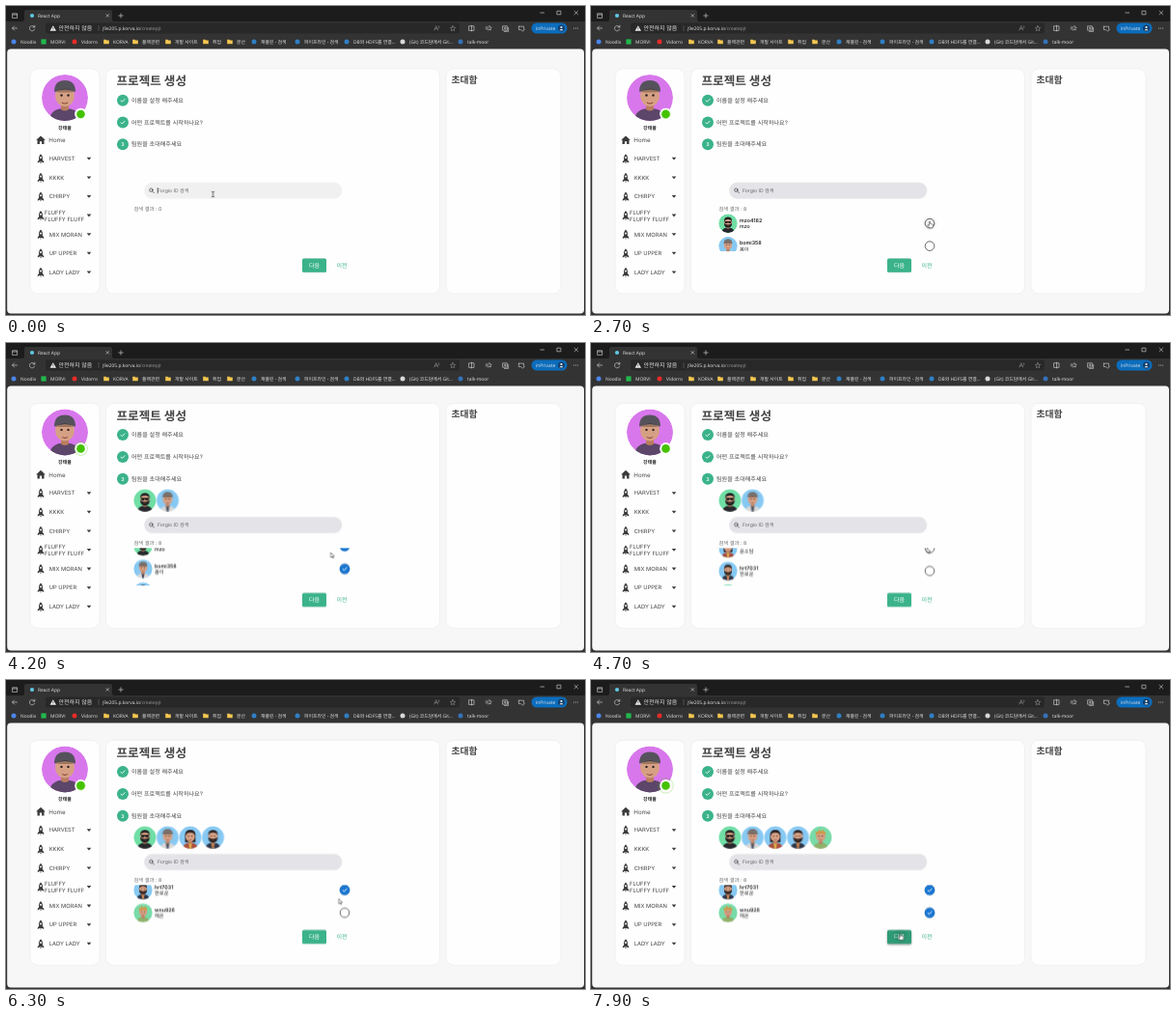
Animation of 600 by 320 pixels, one loop 8000 ms. Source, as an HTML page:

```html
<!DOCTYPE html>
<html lang="ko">
<head>
<meta charset="utf-8">
<title>React App</title>
<style>
html, body { margin: 0; width: 100%; height: 100%; overflow: hidden; background: #1c1c1c; }
svg { display: block; width: 600px; height: 320px; }
text { font-family: Inter, 'Noto Sans CJK KR', sans-serif; fill: #444; text-rendering: geometricPrecision; }
#chrome text { font-family: 'Open Sans', 'Noto Sans CJK KR', sans-serif; font-size: 4.9px; fill: #e6e6e6; }
#chrome .notice { font-size: 6px; }
.icon { fill: none; stroke: #cfcfcf; stroke-width: .65; stroke-linecap: round; stroke-linejoin: round; }
.dim { stroke: #8c8c8c; }
.card { fill: #fefefe; stroke: #ededee; stroke-width: .7; }
.green { fill: #3bb38a; }

#page, #list, #count0, #count1, #hint, #caret, #ibeam, #arrow, #hand, .pick {
  animation: 8s step-end infinite;
}
#page { animation-name: lift; }
#list, #count1 { animation-name: found; }
#count0 { animation-name: empty; }
#hint { animation-name: hint; }
#caret { animation-name: caret; }
#ibeam { animation-name: ibeam; }
#arrow { animation-name: arrow; }
#hand { animation-name: hand; }
#field { animation: field 8s linear infinite; }
#rows { animation: scroll 8s ease-in-out infinite; }
#cursor { animation: move 8s ease-in-out infinite; }
#next { animation: next 8s linear infinite; }
.p0 { animation-name: p0; } .p1 { animation-name: p1; } .p2 { animation-name: p2; }
.p3 { animation-name: p3; } .p4 { animation-name: p4; }

@keyframes lift { 0% { transform: none } 35% { transform: translateY(-2.6px) } }
@keyframes found { 0% { opacity: 0 } 11.5% { opacity: 1 } }
@keyframes empty { 0% { opacity: 1 } 11.5% { opacity: 0 } 100% { opacity: 0 } }
@keyframes hint { 0%, 32% { opacity: 1 } 6.5% { opacity: 0 } }
@keyframes caret {
  0% { opacity: 1; transform: none }
  6.5% { opacity: 0; transform: translateX(1.6px) }
  13.25%, 26.5% { opacity: 1; transform: translateX(1.6px) }
  19.9%, 32% { opacity: 0; transform: translateX(1.6px) }
}
@keyframes field {
  0% { fill: #f0f0f1; stroke: #f0f0f1 }
  2.5%, 32% { fill: #fefefe; stroke: #ececee }
  33.6%, 100% { fill: #e4e4e8; stroke: #e4e4e8 }
}
@keyframes scroll {
  0%, 50.5% { transform: none }
  56.8%, 75% { transform: translateY(-57px) }
  78%, 100% { transform: translateY(-75.5px) }
}
@keyframes p0 { 0% { opacity: 0 } 35% { opacity: 1 } }
@keyframes p1 { 0% { opacity: 0 } 42.5% { opacity: 1 } }
@keyframes p2 { 0% { opacity: 0 } 61.25% { opacity: 1 } }
@keyframes p3 { 0% { opacity: 0 } 73.75% { opacity: 1 } }
@keyframes p4 { 0% { opacity: 0 } 85% { opacity: 1 } }
@keyframes next {
  0%, 93.5% { fill: #3bb38a; filter: drop-shadow(0 .4px .4px #0003) }
  96%, 100% { fill: #2f9b76; filter: drop-shadow(0 1px 1.2px #0006) }
}
@keyframes move {
  0%, 21.5% { transform: translate(214.5px, 195px) }
  28.75%, 36.25% { transform: translate(351px, 223px) }
  39.4%, 45% { transform: translate(351px, 244px) }
  50%, 57.1% { transform: translate(336.5px, 217px) }
  59.5%, 63.1% { transform: translate(351px, 211px) }
  65.6%, 66.9% { transform: translate(341.5px, 222px) }
  69.4%, 74.4% { transform: translate(351px, 234px) }
  77.5%, 79.4% { transform: translate(344.8px, 226.5px) }
  81.9%, 86.25% { transform: translate(351px, 239px) }
  94%, 100% { transform: translate(320.5px, 262.5px) }
}
@keyframes ibeam { 0% { opacity: 1 } 22.5% { opacity: 0 } 100% { opacity: 0 } }
@keyframes arrow {
  0%, 28.1%, 39.4%, 58.8%, 69.4%, 81.9%, 93.8% { opacity: 0 }
  22.5%, 36.3%, 45%, 63.1%, 75%, 87.5% { opacity: 1 }
}
@keyframes hand {
  0%, 36.3%, 45%, 63.1%, 75%, 87.5% { opacity: 0 }
  28.1%, 39.4%, 58.8%, 69.4%, 81.9%, 93.8% { opacity: 1 }
}
</style>
</head>
<body>
<svg viewBox="0 0 600 320">
  <defs>
    <clipPath id="disc"><circle r="24"/></clipPath>
    <clipPath id="window"><rect x="125" y="215.2" width="245" height="38.8"/></clipPath>
    <path id="rocket" fill-rule="evenodd" d="M0-4.8C2-3 2.2-.5 1.8 1.4L3.2 3V4.6L1.2 3.5H-1.2L-3.2 4.6V3L-1.8 1.4C-2.2-.5-2-3 0-4.8ZM0-2A1 1 0 1 0 0 0A1 1 0 1 0 0-2ZM-.8 4H.8L0 5.3Z"/>
    <path id="folder" fill="#f3c64f" d="M-2.8-2.2H-.6L.2-1.5H2.8V2.2H-2.8Z"/>
    <path id="tick" d="M-2.2 0L-.7 1.5L2.3-1.5" fill="none" stroke="#fff"/>
  </defs>

  <g id="chrome">
    <rect width="600" height="320" fill="#1c1c1c"/>
    <path d="M0 16H17Q19 16 19 14V6Q19 4 21 4H108Q110 4 110 6V14Q110 16 112 16H600V320H0Z" fill="#333"/>
    <rect x="41" y="17.5" width="429" height="11" rx="2.5" fill="#282828"/>
    <circle cx="27" cy="10" r="2.1" fill="#61c8e4"/>
    <text x="33" y="11.6">React App</text>
    <g class="icon">
      <path d="M7 7.8H11.6V12.4H7ZM7 9H11.6M104 8.6L106.6 11.2M106.6 8.6L104 11.2M119 7.8V12.2M116.8 10H121.2"/>
      <path d="M553.8 7H557.6M571.3 5.2H574.9V8.8H571.3ZM589 5.2L592.6 8.8M592.6 5.2L589 8.8"/>
      <path d="M11.5 23H6.5M8.6 20.9L6.5 23L8.6 25.1M29.6 22A2.7 2.7 0 1 0 29.6 24.3M29.8 20.2V22H28"/>
      <path class="dim" d="M443.8 25L445.8 20.6L447.6 25M444.6 23.6H446.8M448.6 20.8Q449.4 22 448.6 23"/>
      <path class="dim" d="M463 20.5L463.8 22.3L465.7 22.5L464.3 23.8L464.7 25.7L463 24.7L461.3 25.7L461.7 23.8L460.3 22.5L462.2 22.3Z"/>
      <path d="M480 20.8H485V25.4H480ZM482.5 20.2V26M497.2 22H500M497.2 23.8H499.2M500.8 20.4L501.5 22L503.2 22.2L502 23.4L502.3 25L500.8 24.2L499.4 25"/>
      <path d="M515 20.8H519.4V25.2H515ZM516.4 26.4H520.6V22.4M517.2 22V24M516.2 23H518.2M531.4 21.2H536.6V24M531.4 21.2V24.6H533.4M534.4 25.2L535.6 26.2L537.4 24.2"/>
    </g>
    <g fill="#d4d4d4"><circle cx="588.4" cy="23" r=".5"/><circle cx="590.4" cy="23" r=".5"/><circle cx="592.4" cy="23" r=".5"/></g>
    <path d="M48.8 20.2L52 25.8H45.6Z" fill="#eee"/><path d="M48.8 22V24M48.8 24.6V25" stroke="#282828" stroke-width=".6"/>
    <text class="notice" x="54.5" y="25.1">안전하지 않음</text>
    <path d="M96 20V26" stroke="#777" stroke-width=".5"/>
    <text x="100" y="24.8">j9e205.p.korva.io<tspan fill="#999">/createpjt</tspan></text>
    <rect x="544.5" y="17.5" width="37" height="11" rx="5.5" fill="#0c6dbd"/>
    <text x="549" y="24.7">InPrivate</text>
    <circle cx="575.5" cy="23" r="3.5" fill="#143f6b"/><circle cx="575.5" cy="22" r="1.1" fill="#fff"/><path d="M573.5 25.3Q575.5 22.6 577.5 25.3Z" fill="#fff"/>
    <g id="marks"></g>
  </g>

  <rect x="1.2" y="44.4" width="597.8" height="274" rx="4" fill="#f7f7f8"/>

  <g id="page">
    <rect class="card" x="25" y="65" width="72" height="233" rx="8"/>
    <rect class="card" x="103.5" y="65" width="346" height="233" rx="8"/>
    <rect class="card" x="456" y="65" width="119" height="233" rx="8"/>

    <g id="profile" transform="translate(61 95)"></g>
    <circle cx="77.5" cy="112" r="6.3" fill="#fff"/>
    <circle cx="77.5" cy="112" r="4.3" fill="#44c200"/>
    <g transform="translate(77.5 112)"><circle id="ring" r="4.3" fill="none" stroke="#44c200" stroke-width=".4"/></g>
    <text x="61" y="128" font-size="5" font-weight="700" text-anchor="middle" style="fill:#222">강태율</text>
    <path d="M36 134.4L40.8 138.8H39.5V143H37.1V140.2H34.9V143H32.5V138.8H31.2Z" fill="#3a3a3a"/>
    <text x="44.3" y="141.3" font-size="6.2">Home</text>
    <g id="menu"></g>

    <text x="114.5" y="82.4" font-size="12.6" font-weight="700">프로젝트 생성</text>
    <text x="461.5" y="79.9" font-size="9.8" font-weight="700">초대함</text>
    <g id="steps"></g>
    <g id="team"></g>

    <rect id="field" x="143.5" y="183" width="204.5" height="16.3" rx="8" stroke-width=".6"/>
    <g fill="none" stroke="#333" stroke-width=".7" stroke-linecap="round"><circle cx="150.4" cy="190.6" r="1.7"/><path d="M151.7 191.9L153.4 193.6"/></g>
    <text id="hint" x="157" y="193" font-size="5.1" style="fill:#666">Forgio ID 검색</text>
    <path id="caret" d="M157.2 188V194.3" stroke="#222" stroke-width=".6"/>
    <g font-size="5.3">
      <text id="count0" x="132.5" y="212" style="fill:#666">검색 결과 : 0</text>
      <text id="count1" x="132.5" y="212" style="fill:#666">검색 결과 : 8</text>
    </g>
    <g id="list"><g clip-path="url(#window)"><g id="rows"></g></g></g>

    <rect id="next" x="307" y="261.5" width="25" height="14.3" rx="1.6"/>
    <text x="319.5" y="270.9" font-size="6" text-anchor="middle" style="fill:#fff">다음</text>
    <text x="348" y="270.9" font-size="6" text-anchor="middle" style="fill:#3bb38a">이전</text>
  </g>

  <g id="cursor">
    <path id="ibeam" d="M-1.4-2.8Q0-2.8 0-2Q0-2.8 1.4-2.8M0-2V2M-1.4 2.8Q0 2.8 0 2Q0 2.8 1.4 2.8" fill="none" stroke="#222" stroke-width=".7"/>
    <path id="arrow" d="M0 0V5.2L1.3 4.1L2.2 6L3 5.6L2.2 3.8H3.8Z" fill="#fff" stroke="#111" stroke-width=".45"/>
    <g id="hand">
      <circle cy="2.3" r="7" fill="#000" opacity=".05"/>
      <path d="M-.6.4Q0-.4.6.4V2.6L3 3.1Q3.6 3.3 3.5 4L3 6.8H-.4L-2.3 4.3Q-2.2 3.2-1.2 3.9L-.6 4.4Z" fill="#fff" stroke="#111" stroke-width=".45"/>
    </g>
  </g>
</svg>
<script>
const $ = id => document.getElementById(id);
const fill = (id, items, draw) => { $(id).innerHTML = items.map(draw).join(''); };

const hats = {
  cap: c => `<path d="M-11-6Q-11-18 0-18Q11-18 11-6Q0-11-11-6Z" fill="${c}"/><path d="M-10-6Q0-13 10-6Q0-5-10-6Z" fill="#0004"/>`,
  short: c => `<path d="M-10-3Q-11-16 0-16Q11-16 10-3Q8-10 0-10Q-8-10-10-3Z" fill="${c}"/>`,
  spiky: c => `<path d="M-9.5-4L-11-13L-6-12L-3-18L1-13L6-17L7-12L11-12L9.5-4Q0-12-9.5-4Z" fill="${c}"/>`
};

function person({ bg, shirt, hair, hat = 'short', beard, shades, long, accent }) {
  return `<g clip-path="url(#disc)"><circle r="24" fill="${bg}"/>` +
    (long ? `<path d="M-11 10V-6Q-10-16 0-16Q10-16 11-6V10Z" fill="${hair}"/>` : '') +
    `<path d="M-16 25Q-16 11 0 11Q16 11 16 25Z" fill="${shirt}"/>` +
    (accent ? `<path d="M-4 11H4L1.5 25H-1.5Z" fill="${accent}"/>` : '') +
    `<path d="M-4 4H4V12Q0 15-4 12Z" fill="#b97d5f"/>
    <ellipse cy="-2" rx="10" ry="11" fill="#d6a084"/>` +
    (beard ? `<path d="M-10-1Q-5 4 0 3Q5 4 10-1Q10 11 0 11Q-10 11-10-1Z" fill="${hair}"/>` : '') +
    (shades ? '<path d="M-9-5H9L7 0H2L0-3L-2 0H-7Z" fill="#151515"/>'
      : '<circle cx="-3.5" cy="-2.5" r="1.2" fill="#2b2020"/><circle cx="3.5" cy="-2.5" r="1.2" fill="#2b2020"/>') +
    `<path d="M-3 5Q0 7 3 5" fill="none" stroke="#8a4638" stroke-width="1.1"/>${hats[hat](hair)}</g>`;
}

const users = [
  { id: 'mzo4182', name: 'mzo', bg: '#70dea5', shirt: '#26282b', hair: '#222', beard: true, shades: true },
  { id: 'bomi358', name: '봄이', bg: '#87c9f3', shirt: '#d8d8da', hair: '#77716e', hat: 'cap', accent: '#4a505e' },
  { id: 'sodam21', name: '윤소담', bg: '#87c9f3', shirt: '#a94f3f', hair: '#2b2326', long: true, accent: '#e0b04a' },
  { id: 'hrt7031', name: '한로운', bg: '#87c9f3', shirt: '#2c3547', hair: '#2d2422', beard: true, accent: '#c98552' },
  { id: 'wnu926', name: '해온', bg: '#78dba8', shirt: '#8fb06a', hair: '#d09a4c', hat: 'spiky' }
];

$('profile').innerHTML = person({ bg: '#d877ec', shirt: '#5c4669', hair: '#56525c', hat: 'cap' });

fill('team', users, (u, i) =>
  `<g class="pick p${i}"><g transform="translate(${144 + 23.5 * i} 165.6) scale(.49)">${person(u)}</g></g>`);

fill('rows', users, (u, i) => `<g transform="translate(0 ${225.1 + 23.5 * i})">
  <g transform="translate(142 0) scale(.41)">${person(u)}</g>
  <g font-size="5.3" font-weight="600"><text x="154" y="-1.2" style="fill:#222">${u.id}</text>
  <text x="154" y="5" style="fill:#222" font-weight="500">${u.name}</text></g>
  <circle cx="351" r="4.8" fill="#fff" stroke="#444" stroke-width=".8"/>
  <g class="pick p${i}"><g transform="translate(351 0)"><circle r="5.3" fill="#1976d2"/><use href="#tick" stroke-width="1"/></g></g></g>`);

fill('menu', ['HARVEST', 'KKKK', 'CHIRPY', 'FLUFFY|FLUFFY FLUFF', 'MIX MORAN', 'UP UPPER', 'LADY LADY'], (label, i) => {
  const y = 158 + 19.6 * i, lines = label.split('|'), two = lines.length > 1;
  return `<use href="#rocket" x="36" y="${y}" fill="#3a3a3a"/><path d="M83.7 ${y - 1.2}H88.3L86 ${y + 1.6}Z" fill="#3a3a3a"/>` +
    lines.map((s, k) => `<text x="${two ? 40 : 44.7}" y="${y + 2.1 + (two ? 7 * k - 3.4 : 0)}" font-size="5.8">${s}</text>`).join('');
});

fill('steps', ['이름을 설정 해주세요', '어떤 프로젝트를 시작하나요?', '팀원을 초대해주세요'], (label, i) => {
  const y = 97.7 + 22.8 * i;
  return `<circle class="green" cx="121" cy="${y}" r="6"/>` +
    (i < 2 ? `<use href="#tick" x="121" y="${y}" stroke-width=".9"/>`
      : `<text x="121" y="${y + 1.9}" font-size="5.2" font-weight="600" text-anchor="middle" style="fill:#fff">3</text>`) +
    `<text x="130" y="${y + 2.1}" font-size="6.1">${label}</text>`;
});

const dot = color => x => `<circle cx="${x}" cy="37" r="2.5" fill="${color}"/>`;
const folder = x => `<use href="#folder" x="${x}" y="37"/>`;
fill('marks', [
  [8, 'Noodix', dot('#4a86e8')], [39, 'MORVI', x => `<rect x="${x - 2.6}" y="34.4" width="5.2" height="5.2" fill="#22b84c"/>`],
  [71, 'Vidorro', dot('#e62b28')], [104, 'KORVA', folder], [134, '플랙관련', folder], [168, '개발 사이트', folder],
  [207, '취업', folder], [232, '분산', folder], [257, '재플린 - 검색', dot('#2f7fc4')], [302, '파이프라인 - 검색', dot('#2f7fc4')],
  [353, 'DB와 HDFS를 연결...', dot('#2f7fc4')], [411, '(Git) 코드담에서 Git...', dot('#d8d8d8')], [471, 'talk-moor', dot('#3572b8')]
], ([x, label, icon]) => `${icon(x)}<text x="${x + 7}" y="38.8">${label}</text>`);

// Status ripple: 1.2 s pulses that restart with every 8 s loop
function pulse() {
  const p = performance.now() % 8000 % 1200 / 1200, e = p * p * (3 - 2 * p);
  $('ring').setAttribute('transform', `scale(${.8 + 1.6 * e})`);
  $('ring').setAttribute('opacity', 1 - e);
  requestAnimationFrame(pulse);
}
pulse();
</script>
</body>
</html>
```
